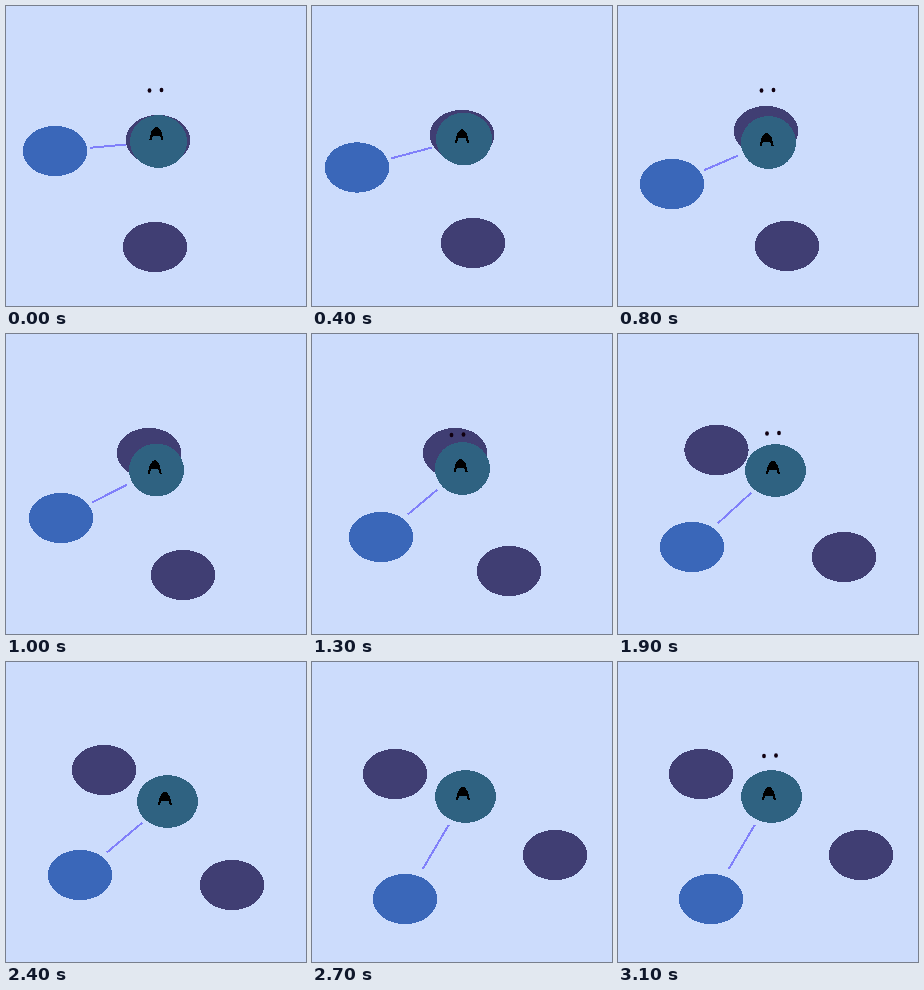
Animation of 300 by 300 pixels, one loop 3200 ms. Source, as an HTML page:

```html
<!DOCTYPE html>
<html>
<head>
<meta charset="utf-8">
<style>
html, body { margin: 0; width: 100%; height: 100%; overflow: hidden; background: #ccdcfc; }
svg { display: block; width: 100%; height: 100%; }
</style>
</head>
<body>
<svg viewBox="0 0 300 300" shape-rendering="crispEdges">
  <ellipse id="blue" rx="32.2" ry="25.2" fill="#3a67b9"/>
  <ellipse id="low" rx="32.2" ry="25.2" fill="#403e73"/>
  <ellipse id="rear" rx="32.2" ry="25.2" fill="#403e73"/>
  <line id="arm" stroke="#8080fa" stroke-width="2"/>
  <ellipse id="head" ry="26.4" fill="#2f6281"/>
  <path id="mouth" d="M-7 6.5L-5 -2Q-2 -6.5 0 -7Q2 -6.5 5 -2L7 6.5H5L3.5 2H-3.5L-5 6.5Z"/>
  <g id="eyes" fill="#100010" shape-rendering="auto">
    <ellipse cx="-6" cy=".5" rx="1.9" ry="2.3"/>
    <ellipse cx="6" rx="1.9" ry="2.3"/>
  </g>
</svg>
<script>
const LOOP = 3200;
// The drawing holds still between these moments
const steps = [0, 200, 400, 500, 600, 700, 800, 1000, 1300,
  1700, 1800, 1900, 2000, 2100, 2300, 2400, 2500, 2700, 2900];

// time, then x y of blue, low, rear and head, and the head's half width
const poses = [
  [200, 49, 145, 149, 241, 152, 134, 152.5, 135.5, 28.5],
  [400, 45, 161.5, 161, 237, 150, 129, 152, 133, 28],
  [800, 54, 178, 169, 240, 148, 125, 150.5, 136.5, 27.5],
  [1000, 55, 184, 177, 241, 143, 119, 150.5, 136, 27.5],
  [1300, 69, 203, 197, 237, 143, 119, 150.5, 134.5, 27.5],
  [1900, 74, 213, 226, 223, 98.5, 116, 157.5, 136.5, 30.5],
  [2400, 74, 213, 226, 223, 98, 108, 161.5, 139.5, 30.5],
  [2500, 93, 237, 243, 193, 83, 112, 153.5, 134.5, 30.5]
];

// Open eyes: from, to, x, y
const looks = [
  [0, 400, 149.5, 84], [600, 1000, 149.5, 84], [1300, 1700, 145.5, 100.5],
  [1700, 2000, 155, 99], [2500, 2700, 153, 96.5], [2900, LOOP, 152, 93.5]
];

const el = id => document.getElementById(id);
const set = (id, attrs) => {
  for (const name in attrs) el(id).setAttribute(name, attrs[name]);
};

function poseAt(t) {
  const next = poses.findIndex(p => p[0] > t);
  if (next < 1) return poses.at(next);
  const a = poses[next - 1], b = poses[next];
  const k = (t - a[0]) / (b[0] - a[0]);
  return a.map((v, i) => v + (b[i] - v) * k);
}

function draw(now) {
  const time = now % LOOP;
  const t = steps.findLast(s => s <= time);
  const [, bx, by, lx, ly, rx, ry, hx, hy, hw] = poseAt(t);
  set('blue', { cx: bx, cy: by });
  set('low', { cx: lx, cy: ly });
  set('rear', { cx: rx, cy: ry });
  set('head', { cx: hx, cy: hy, rx: hw });

  // The arm fills the gap between blue and head
  const d = Math.hypot(hx - bx, hy - by);
  const ux = (hx - bx) / d, uy = (hy - by) / d;
  set('arm', { x1: bx + 35 * ux, y1: by + 35 * uy, x2: hx - 33 * ux, y2: hy - 33 * uy });

  const lift = t < 200 ? 8 : 3;
  set('mouth', { transform: `translate(${hx - hw / 4 + 5} ${hy - lift})` });

  const look = looks.find(([from, to]) => t >= from && t < to);
  el('eyes').style.display = look ? '' : 'none';
  if (look) set('eyes', { transform: `translate(${look[2]} ${look[3]})` });
}

let start;
function tick(now) {
  start ??= now;
  draw(now - start);
  requestAnimationFrame(tick);
}
draw(0);
requestAnimationFrame(tick);
</script>
</body>
</html>
```
